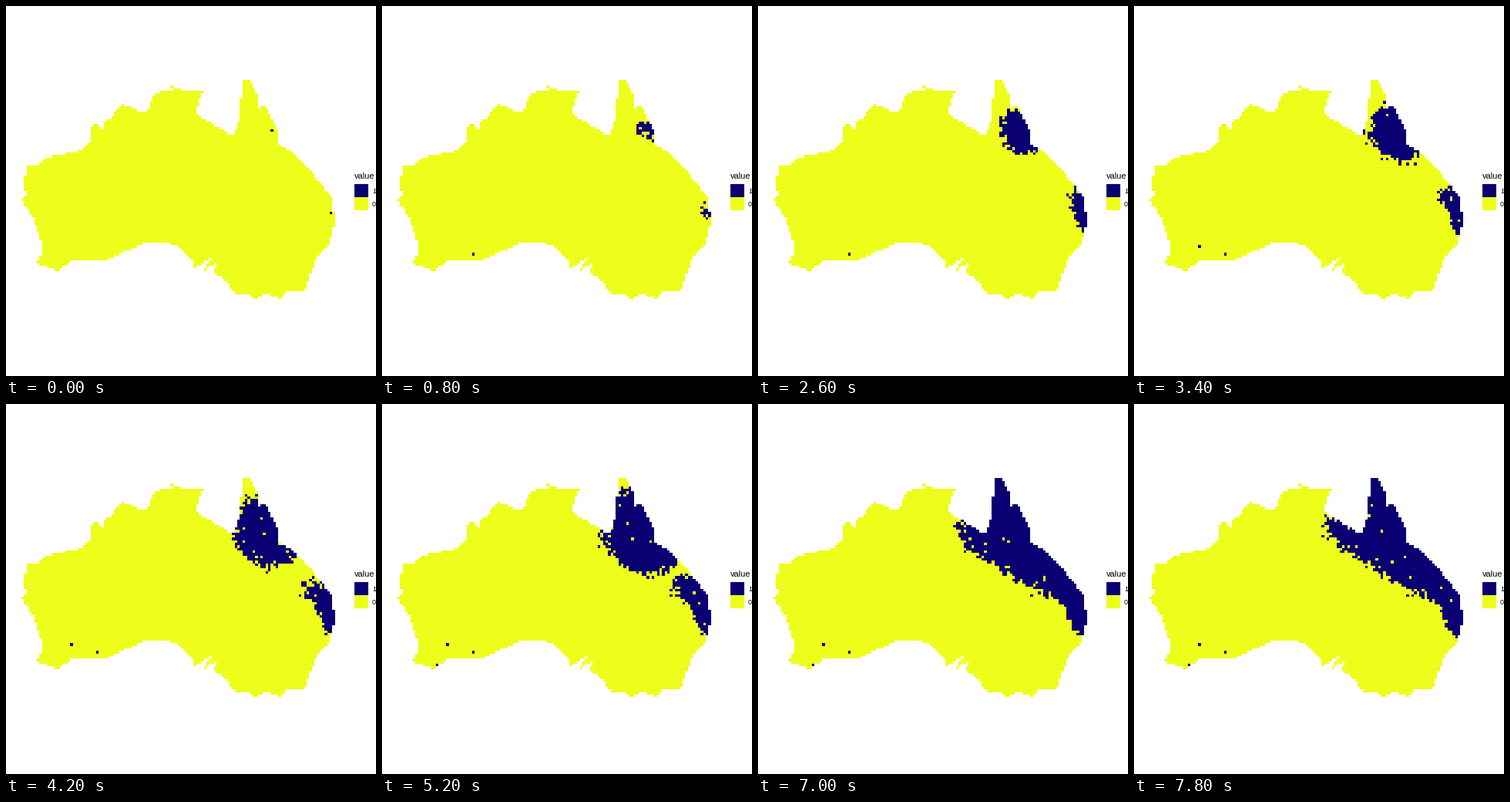
These frames come from a looping animation (480x480 px, 8000 ms). A matplotlib script:

```python
import numpy as np
import matplotlib.pyplot as plt
from matplotlib.animation import FuncAnimation
from matplotlib.patches import Rectangle
from matplotlib.path import Path

SIZE, DPI = 480, 100
STEPS, STEP_MS = 40, 200
CELLS = 144
CELL = SIZE / CELLS
NAVY, YELLOW, WHITE = (11, 0, 115), (238, 254, 27), (255, 255, 255)

# Capes and bays in grid cells; straight runs between them make the coast.
NORTH_COAST = [
    (8, 62), (13, 62), (16, 59), (30, 56), (33, 53), (33, 48), (35, 46),
    (38, 49), (38, 45), (41, 43.5), (45, 38), (51, 40.5), (55, 41), (58, 34),
    (65, 32.5), (62, 30.5), (68, 32.5), (77, 33), (75, 37), (74, 42),
    (87, 50), (89, 50), (91, 44), (91, 39), (92.5, 29), (95, 29), (98, 35),
    (98, 40), (101, 39), (106, 49), (105.5, 54), (112, 57), (120, 66),
]
SOUTH_COAST = [
    (127, 75), (128, 84), (126, 92), (121, 98), (116, 111), (109, 111.5),
    (107, 114), (101, 112), (97, 114), (94, 112), (89, 112), (86, 107),
    (81, 104), (82, 100), (77, 103), (80, 98), (73, 102), (73, 100),
    (68, 94), (62, 92), (54, 92), (39, 99), (26, 99), (20, 103), (12, 100),
    (14, 96.5), (14, 92), (11, 83), (6, 75.5), (8, 73), (7, 70),
]
SEEDS = [(103, 48), (126, 80)]

# Southern edge of the favourable zone, in pixels.
EDGE_X, EDGE_Y = zip((240, 170), (300, 201), (335, 226), (395, 253), (403, 283), (427, 300))


def land_mask():
    mid = np.arange(CELLS) + 0.5
    gx, gy = np.meshgrid(mid, mid)
    centres = np.column_stack([gx.ravel() + 0.01, gy.ravel() + 0.013])
    land = Path(NORTH_COAST + SOUTH_COAST).contains_points(centres)
    return land.reshape(CELLS, CELLS), gx * CELL, gy * CELL


def arrival_steps(x, y):
    """Step at which the spread reaches each cell."""
    rng = np.random.default_rng(12)
    north, east = [np.hypot(x - (i + 0.5) * CELL, y - (j + 0.5) * CELL)
                   for i, j in SEEDS]
    # Past the gulf the front runs west faster, but turns north slowly.
    west = np.maximum(0, 290 - x)
    north += west * (np.maximum(0, 155 - y) / 60 - 0.2)
    inland = np.maximum(0, y - 250) * np.maximum(0, 418 - x)
    steps = np.minimum(north / 2.3, east / 2.15 + 0.05 * inland)
    edge = np.interp(x, EDGE_X, EDGE_Y) + rng.normal(0, 5.5, x.shape)
    steps += 2 * np.maximum(0, y - edge)
    steps += rng.normal(0, 1.8, x.shape) * (1 + inland / 300)
    steps = np.maximum(1, steps)
    for i, j in SEEDS:
        steps[j, i] = 0
    return steps


LAND, X, Y = land_mask()
ARRIVAL = arrival_steps(X, Y)
PIXELS = np.arange(SIZE) + 0.5
COLS = (PIXELS / CELL).astype(int)
ROWS = ((PIXELS + 0.37) / 3.34).astype(int)


def picture(step):
    taken = LAND & (ARRIVAL <= step)
    if step:
        # A few cells drop out at each step, more of them near the front.
        age = np.maximum(step - ARRIVAL, 0)
        chance = 0.012 + 0.12 * np.exp(-age / 2)
        taken &= np.random.default_rng(500 + step).random(LAND.shape) > chance
    img = np.full((CELLS, CELLS, 3), WHITE, np.uint8)
    img[LAND] = YELLOW
    img[taken] = NAVY
    return img[np.ix_(ROWS, COLS)]


def px(size):
    return size * 72 / DPI


plt.rcParams["font.family"] = "Liberation Sans"
fig = plt.figure(figsize=(SIZE / DPI, SIZE / DPI), dpi=DPI, facecolor="white")
ax = fig.add_axes([0, 0, 1, 1])
ax.axis("off")
grid = ax.imshow(picture(0), extent=(0, SIZE, SIZE, 0),
                 interpolation="nearest", aspect="auto")
ax.set_xlim(0, SIZE)
ax.set_ylim(SIZE, 0)

ax.text(452, 224, "value", fontsize=px(11), color="black", va="baseline")
for top, colour, label in [(231, NAVY, "1"), (248, YELLOW, "0")]:
    ax.add_patch(Rectangle((452, top), 18, 17, facecolor="#%02x%02x%02x" % colour,
                           linewidth=0, antialiased=False))
    ax.text(475, top + 12, label, fontsize=px(8.8), color="black", va="baseline")


def update(step):
    grid.set_data(picture(step))
    return (grid,)


anim = FuncAnimation(fig, update, frames=STEPS, interval=STEP_MS,
                     repeat=True, repeat_delay=0, blit=False)
plt.show()
```
